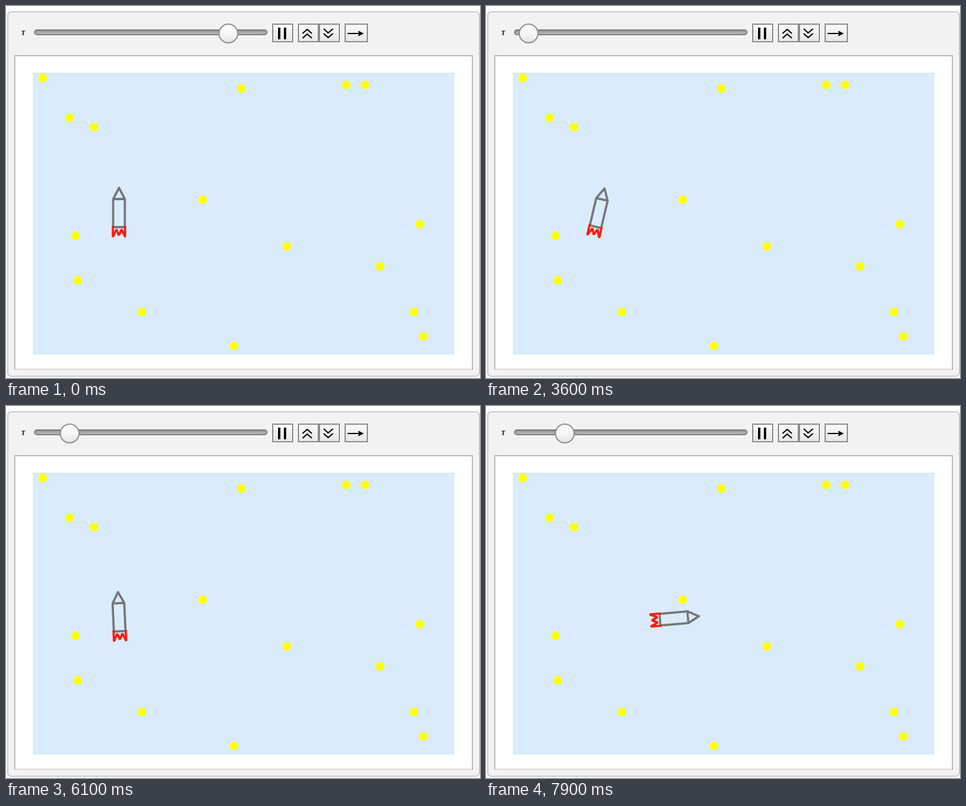
An HTML page for the animation above (8 s loop, 812 px wide and 636 px high).

```html
<!DOCTYPE html>
<html lang="en">
<head>
<meta charset="utf-8">
<title>Rocket</title>
<style>
  html, body { margin: 0; width: 100%; height: 100%; overflow: hidden; background: #fff; }
  svg { display: block; width: 812px; height: 636px; }
  .button { fill: url(#face); stroke: #8a8a8a; stroke-width: 2; }
  .icon { fill: none; stroke: #000; stroke-width: 2.2; }
  .hull { fill: none; stroke: #777; stroke-width: 3.8; stroke-linejoin: round; }
  .flame { fill: none; stroke: #ff1c0a; stroke-width: 3.8; stroke-linejoin: bevel; }
  text { font: italic bold 16px "Liberation Serif", "DejaVu Serif", serif; fill: #333; }
</style>
</head>
<body>
<svg viewBox="0 0 812 636">
  <defs>
    <linearGradient id="face" x2="0" y2="1">
      <stop stop-color="#fdfdfd"/><stop offset=".5" stop-color="#f0f0f0"/><stop offset="1" stop-color="#e6e6e6"/>
    </linearGradient>
    <linearGradient id="groove" x2="0" y2="1">
      <stop stop-color="#8c8c8c"/><stop offset="1" stop-color="#c4c4c4"/>
    </linearGradient>
    <linearGradient id="ball" x2="0" y2="1">
      <stop stop-color="#fff"/><stop offset=".5" stop-color="#f6f6f6"/><stop offset="1" stop-color="#e4e4e4"/>
    </linearGradient>
  </defs>

  <rect x="3" y="10" width="808" height="623" rx="6" fill="#f2f2f2" stroke="#c9c9c9" stroke-width="2"/>
  <rect x="15" y="85" width="784" height="536" fill="#fff" stroke="#b8b8b8" stroke-width="2"/>
  <path d="M16 621H798" stroke="#d8d8d8" stroke-width="2"/>
  <rect x="46" y="114" width="722" height="482" fill="#d9ebfd"/>

  <text x="26" y="50">τ</text>
  <rect x="49" y="41" width="398" height="8" rx="4" fill="url(#groove)" stroke="#7c7c7c" stroke-width="2"/>
  <circle id="knob" cy="47" r="16" fill="url(#ball)" stroke="#8e8e8e" stroke-width="2"/>

  <rect class="button" x="457" y="31" width="34" height="30"/>
  <rect class="button" x="501" y="31" width="34" height="30"/>
  <rect class="button" x="537" y="31" width="34" height="30"/>
  <rect class="button" x="581" y="31" width="38" height="30"/>
  <path d="M466 37h4v20h-4z M476 37h4v20h-4z M613 47l-10 -5 2 5 -2 5z"/>
  <path class="icon" d="M508 47l8 -7 8 7 M508 55l8 -7 8 7 M544 39l8 7 8 -7 M544 47l8 7 8 -7 M585 47h20"/>

  <g id="stars" fill="#ff0"></g>
  <g id="rocket">
    <path class="hull" d="M-10 -22L0 -41L10 -22V26H-10V-22H10"/>
    <path class="flame" d="M-10.5 24V43L-4.5 30L0 40L4.5 30L10.5 43V24"/>
  </g>
</svg>
<script>
  const LOOP = 8, STEP = 0.1;   // seconds
  const RESTART = 3.4;          // the slider jumps back to its left end
  const TURN = 6.2;             // the rocket begins to swing to the right
  const THRUST = 6.72;          // the rocket begins to speed up

  const stars = [
    [63, 123], [109, 191], [151, 207], [403, 141], [583, 135], [615, 135],
    [337, 331], [119, 393], [123, 469], [233, 523], [391, 581], [481, 411],
    [641, 445], [709, 373], [699, 523], [715, 565]
  ];

  const rocket = document.getElementById("rocket");
  const knob = document.getElementById("knob");
  document.getElementById("stars").innerHTML =
    stars.map(([x, y]) => `<circle cx="${x}" cy="${y}" r="7.3"/>`).join("");

  const clamp = v => Math.min(1, Math.max(0, v));
  const smooth = v => v * v * (3 - 2 * v);
  const snapOdd = v => 2 * Math.floor(v / 2) + 1;

  function knobX(t) {
    return snapOdd(t < RESTART ? 380.1 + 13.5 * t : 69.22 + 14.4 * (t - RESTART));
  }

  // A damped sway after the restart gives way to the turn.
  function tilt(t) {
    if (t < RESTART) return 0;
    const u = t - RESTART;
    const sway = 14.5 * Math.exp(-0.13 * u) * Math.cos(Math.PI * u / 1.9);
    const turn = smooth(clamp((t - TURN) / 1.1));
    return sway * (1 - turn) + 85 * turn;
  }

  function place(t) {
    const push = Math.max(0, t - THRUST);
    const sag = Math.exp(-(((t - 7.2) / 1.3) ** 2));
    return [193.6 + 93.6 * push * push, 352 + 14.7 * sag];
  }

  function draw(seconds) {
    const t = Math.floor(seconds % LOOP / STEP + 1e-6) * STEP + 1e-6;
    rocket.setAttribute("transform", `translate(${place(t)}) rotate(${tilt(t)})`);
    knob.setAttribute("cx", knobX(t));
  }

  const start = performance.now();
  function tick() {
    draw((performance.now() - start) / 1000);
    requestAnimationFrame(tick);
  }
  tick();
</script>
</body>
</html>
```
